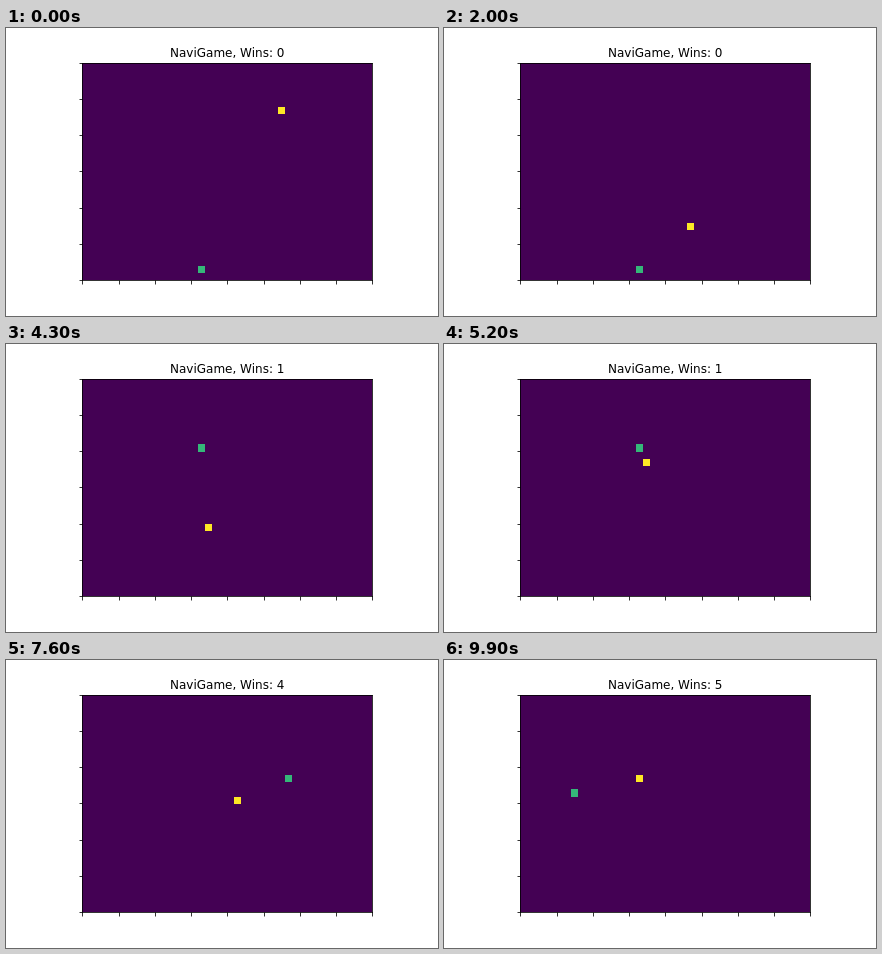
Animation, 432 px wide and 288 px high, one loop 10000 ms. Source, as an HTML page:

```html
<!DOCTYPE html>
<html lang="en">
<head>
<meta charset="utf-8">
<title>NaviGame</title>
<style>
  html, body { margin: 0; width: 100%; height: 100%; overflow: hidden; background: #fff; }
  svg { display: block; width: 432px; height: 288px; }
  text { font: 12px "DejaVu Sans", sans-serif; white-space: pre; }
  path { fill: none; stroke: #000; stroke-width: .8; }
</style>
</head>
<body>
<svg viewBox="0 0 432 288">
  <rect x="76" y="35" width="290" height="217" fill="#440154"/>
  <rect id="goal" fill="#35b779"/>
  <rect id="player" fill="#fde725"/>
  <path id="axes"/>
  <text id="title" x="164" y="29"></text>
</svg>
<script>
const LEFT = 76.44, TOP = 34.56, CELL = 7.248;
const STEP_MS = 100, STEPS = 100, PAUSE = 3;
const GOALS = [[16, 28], [16, 9], [15, 11], [14, 14], [28, 11], [7, 13]];
const byId = id => document.getElementById(id);

// Pixel edges of the grid columns and rows
const edgeX = col => Math.floor(LEFT + CELL * col);
const edgeY = row => Math.ceil(TOP + CELL * row);

function place(rect, [col, row]) {
  const x = edgeX(col), y = edgeY(row);
  rect.setAttribute("x", x);
  rect.setAttribute("y", y);
  rect.setAttribute("width", edgeX(col + 1) - x);
  rect.setAttribute("height", edgeY(row + 1) - y);
}

function axesPath() {
  let d = "M76.1 35.5H366.9M76.1 252.5H366.9M76.5 35.1V252.9M366.5 35.1V252.9";
  for (let i = 0; i <= 40; i += 5) d += `M${Math.round(LEFT + CELL * i) + .5} 252.5V256.5`;
  for (let i = 0; i <= 30; i += 5) d += `M76.5 ${Math.round(TOP + CELL * i) + .5}H73.5`;
  return d;
}

// The player closes the longer distance first and wins beside the goal.
function play() {
  const states = [];
  let [col, row] = [27, 6], wins = 0, rest = 0;
  for (let i = 0; i < STEPS; i++) {
    states.push({ player: [col, row], goal: GOALS[wins], wins });
    const dx = GOALS[wins][0] - col, dy = GOALS[wins][1] - row;
    if (Math.abs(dx) + Math.abs(dy) === 1) {
      if (++rest === PAUSE) { wins++; rest = 0; }
    } else if (Math.abs(dx) > Math.abs(dy)) {
      col += Math.sign(dx);
    } else {
      row += Math.sign(dy);
    }
  }
  return states;
}

const states = play();
const player = byId("player"), goal = byId("goal"), title = byId("title");
byId("axes").setAttribute("d", axesPath());

function draw() {
  const state = states[Math.floor(performance.now() / STEP_MS) % STEPS];
  place(goal, state.goal);
  place(player, state.player);
  title.textContent = `NaviGame, Wins: ${state.wins}`;
  requestAnimationFrame(draw);
}
draw();
</script>
</body>
</html>
```
